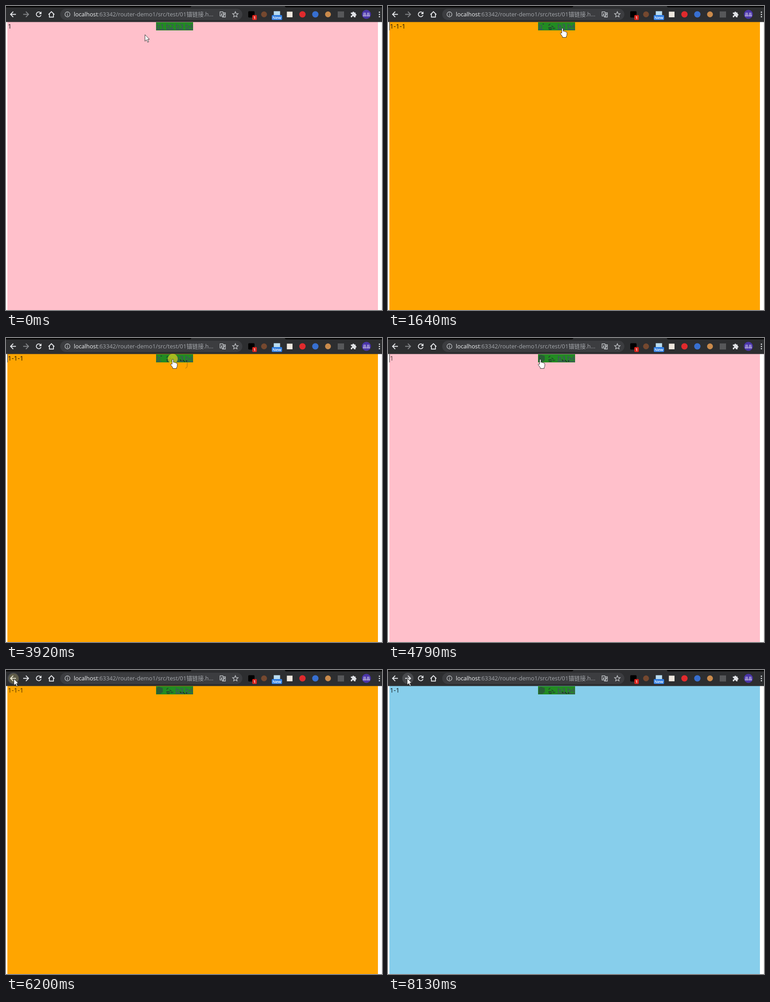
Animation of 832 by 673 pixels, one loop 8420 ms. Source, as an HTML page:

```html
<!DOCTYPE html>
<html lang="zh">
<head>
<meta charset="utf-8">
<title>Anchor links</title>
<style>
  html, body { margin: 0; width: 100%; height: 100%; overflow: hidden; background: #fff; }
  svg { display: block; width: 832px; height: 673px; }
  text { font-family: "Open Sans", "Noto Sans", "Noto Sans CJK SC", "Noto Sans CJK", sans-serif; }
  .page { font-size: 14.8px; }
  .link { fill: #493f70; text-decoration: underline; }
  .url { font-size: 12.75px; fill: #a4a7ab; }
  .badge { font-size: 9px; font-weight: 600; fill: #fff; text-anchor: middle; }
  .icon { fill: none; stroke: #e8eaed; stroke-width: 1.8; }
  .thin { fill: none; stroke: #c4c7ca; stroke-width: 1.3; }
</style>
</head>
<body>
<svg viewBox="0 0 832 673">
  <rect width="832" height="673" fill="#fff"/>
  <path d="M831.5 35V673" stroke="#e8e8e8"/>
  <rect id="page" x="3" y="35" width="820" height="638"/>
  <text id="label" class="page" x="4" y="50"></text>
  <path id="caret" d="M3.5 36V54" stroke="#222"/>

  <rect x="332" y="36" width="82" height="18" fill="#228b22"/>
  <g id="links"></g>
  <g id="mark2">
    <path d="M343 38H371V53H343Z" fill="#228b22"/>
    <path d="M342 40h3M355 43l4-3M356 48h5v4h-4zM362 44l4 3M364 50l6-1" fill="none" stroke="#24482f" stroke-width="2"/>
  </g>
  <path id="mark3" d="M385 48l3 3M391 50h3M394 52h2M398 51h3" fill="none" stroke="#193b20" stroke-width="2.4"/>
  <path id="arc" d="M401 54V62Q401 66 397 67" fill="none" stroke="#a06a10"/>
  <path id="mark1" d="M333 40L338 37 347 40V49L341 53H333Z" fill="#295d36"/>

  <rect width="832" height="35.5" fill="#2d2e30"/>
  <path d="M0 0H410Q410 3 406 3H0ZM617 0H832V3H621Q617 3 617 0Z" fill="#050505"/>
  <circle id="hoverBack" cx="16" cy="18.500" r="12.500" fill="#494a4d"/>
  <circle id="hoverNext" cx="44" cy="18.500" r="12.500" fill="#494a4d"/>
  <path class="icon" d="M22 18.500H10.500M16 12.500L10 18.500 16 24.500"/>
  <path id="next" class="icon" d="M38 18.500H49.500M44 12.500L50 18.500 44 24.500"/>
  <path class="icon" d="M76.500 15A5.300 5.300 0 1 0 77.500 20"/>
  <path d="M78.500 12V18H72.500Z" fill="#e8eaed"/>
  <path class="icon" d="M94 19L100.500 12.500 107 19M96 17.500V24.500H105V17.500"/>

  <rect x="120" y="6" width="403" height="25" rx="12.500" fill="#3c3d40"/>
  <circle class="thin" cx="136" cy="18.500" r="5.500"/>
  <path class="thin" d="M136 15V16.400M136 17.800V22"/>
  <text class="url" x="150" y="23"><tspan fill="#f1f3f4">localhost</tspan>:63342/router-demo1/src/test/01锚链接.h...</text>
  <path class="thin" d="M473.500 13H480L482 22H473.500ZM481 15H485.500V24.500H479L481 22M479 17.500H476.500V19.500H478.500M481 18H485M483 17V18Q482.500 20.500 481 21"/>
  <path class="thin" d="M507.500 12.500L509.200 16.600 513.700 17 510.300 19.900 511.300 24.200 507.500 21.900 503.700 24.200 504.700 19.900 501.300 17 505.800 16.600Z"/>

  <rect x="536" y="11.500" width="14" height="14" rx="2" fill="#000"/>
  <rect x="545" y="20" width="10" height="11" rx="2" fill="#d9251d"/>
  <text class="badge" x="550" y="29">1</text>
  <circle cx="571" cy="18.500" r="6.500" fill="#75482f"/>
  <rect x="592.500" y="11.500" width="14" height="10" fill="#b9dcf0"/>
  <rect x="588" y="20" width="23" height="11" rx="2" fill="#2f7de1"/>
  <text class="badge" x="599.500" y="29">New</text>
  <rect x="621.500" y="12.500" width="12.500" height="12.500" fill="#eee7de"/>
  <circle cx="656" cy="18.500" r="7" fill="#e02a2d"/>
  <circle cx="684.500" cy="18.500" r="7" fill="#376fd0"/>
  <circle cx="712.500" cy="18.500" r="6.500" fill="#c98a4b"/>
  <rect x="734" y="12" width="14" height="13.500" fill="#57585a"/>
  <path d="M763 14.500H766.500A2 2 0 1 1 770.500 14.500H773.500V17.500A2 2 0 1 1 773.500 21.500V25H769.800A2 2 0 1 0 766 25H763V21.200A2 2 0 1 0 763 17.500Z" fill="#dfe1e5"/>
  <circle cx="797.500" cy="18.500" r="10" fill="#4a35a8"/>
  <text x="797.500" y="21.500" font-size="8" fill="#fff" text-anchor="middle">晶晶</text>
  <path d="M825 12.500h2.500v2.500h-2.500zM825 17.500h2.500v2.500h-2.500zM825 22.500h2.500v2.500h-2.500z" fill="#e8eaed"/>

  <g id="pointer">
    <circle id="ring" r="11" fill="#ffdc1e"/>
    <path id="arrow" d="M.5 .5V15L4 11.700 6.500 17.300 8.800 16.300 6.400 10.800H10.500Z" fill="#fff" stroke="#222" stroke-width=".9"/>
    <path id="hand" d="M-1.500 12V3Q-1.500 1 0 1T1.500 3V8Q3.500 6.500 4.500 8.500 6.500 7.500 7.300 9.500 10 9 10 11.500V15Q10 18 8.500 19V21.500H0V19.500L-4.500 13.500Q-5 11.500-3.500 11.500Z" fill="#fff" stroke="#222" stroke-width=".9"/>
  </g>
</svg>
<script>
const LOOP = 8420;
const el = id => document.getElementById(id);
const show = (id, on) => el(id).style.display = on ? '' : 'none';

const pages = [
  ['1', '#ffc0cb'], ['1-1', '#87ceeb'], ['1-1-1', '#ffa500'], ['1-1-1-1', '#9acd32']
];

// time, page index, whether a link click opened it
const visits = [
  [0, 0, false], [880, 1, true], [1390, 2, true], [2240, 3, true], [3420, 2, true],
  [3990, 1, true], [4780, 0, true], [5610, 1, false], [6180, 2, false],
  [6440, 3, false], [7180, 2, false], [7830, 1, false]
];

const presses = [800, 1310, 2190, 3340, 3920, 4700, 5570, 6130, 6400, 7110, 7770];

// time, x, y of the pointer tip
const path = [
  [250, 307, 63], [680, 361, 46], [1110, 361, 46], [1290, 386, 48], [1640, 386, 48],
  [1910, 403, 48], [2570, 403, 48], [2890, 408, 185], [3070, 408, 185],
  [3300, 391, 46], [3540, 391, 46], [3760, 369, 46], [4070, 369, 46],
  [4250, 337, 46], [4850, 337, 46], [5490, 17, 19], [6620, 17, 19], [7020, 42, 18]
];

[332.500, 353.800, 375.100, 396.400].forEach((x, i) => {
  const link = document.createElementNS('http://www.w3.org/2000/svg', 'text');
  link.setAttribute('class', 'page link');
  link.setAttribute('x', x);
  link.setAttribute('y', 50);
  link.textContent = 'b' + (i + 1);
  el('links').append(link);
});

function pointerAt(t) {
  const i = path.findIndex(p => p[0] > t);
  if (i < 0) return path[path.length - 1].slice(1);
  if (i === 0) return path[0].slice(1);
  const [t0, x0, y0] = path[i - 1], [t1, x1, y1] = path[i];
  const u = (t - t0) / (t1 - t0), k = u * u * (3 - 2 * u);
  return [x0 + (x1 - x0) * k, y0 + (y1 - y0) * k];
}

function draw(t) {
  const [since, index, clicked] = visits.filter(v => v[0] <= t).pop();
  const [label, color] = pages[index];
  el('page').setAttribute('fill', color);
  el('label').textContent = label;
  el('label').style.opacity = since && t - since < 80 ? .7 : .87;
  show('caret', clicked && (t - since) % 1020 < 510);

  const [x, y] = pointerAt(t);
  const overNav = x >= 332 && x <= 414 && y >= 36 && y <= 54;
  const near = cx => Math.hypot(x - cx, y - 18.5) < 13;
  el('pointer').setAttribute('transform', `translate(${Math.round(x)} ${Math.round(y)})`);
  show('hand', overNav);
  show('arrow', !overNav);
  show('hoverBack', near(16));
  show('hoverNext', near(44));
  el('next').style.stroke = t < 5610 ? '#85878a' : '#e8eaed';

  const age = Math.min(...presses.map(p => t >= p ? t - p : LOOP));
  el('ring').style.opacity = .6 * Math.max(0, 1 - age / 90);

  show('mark2', t >= 880);
  show('mark3', t >= 3420);
  show('arc', t >= 3540 && t < 3990);
  show('mark1', t >= 4780);
}

function tick() {
  draw(performance.now() % LOOP);
  requestAnimationFrame(tick);
}
tick();
</script>
</body>
</html>
```
